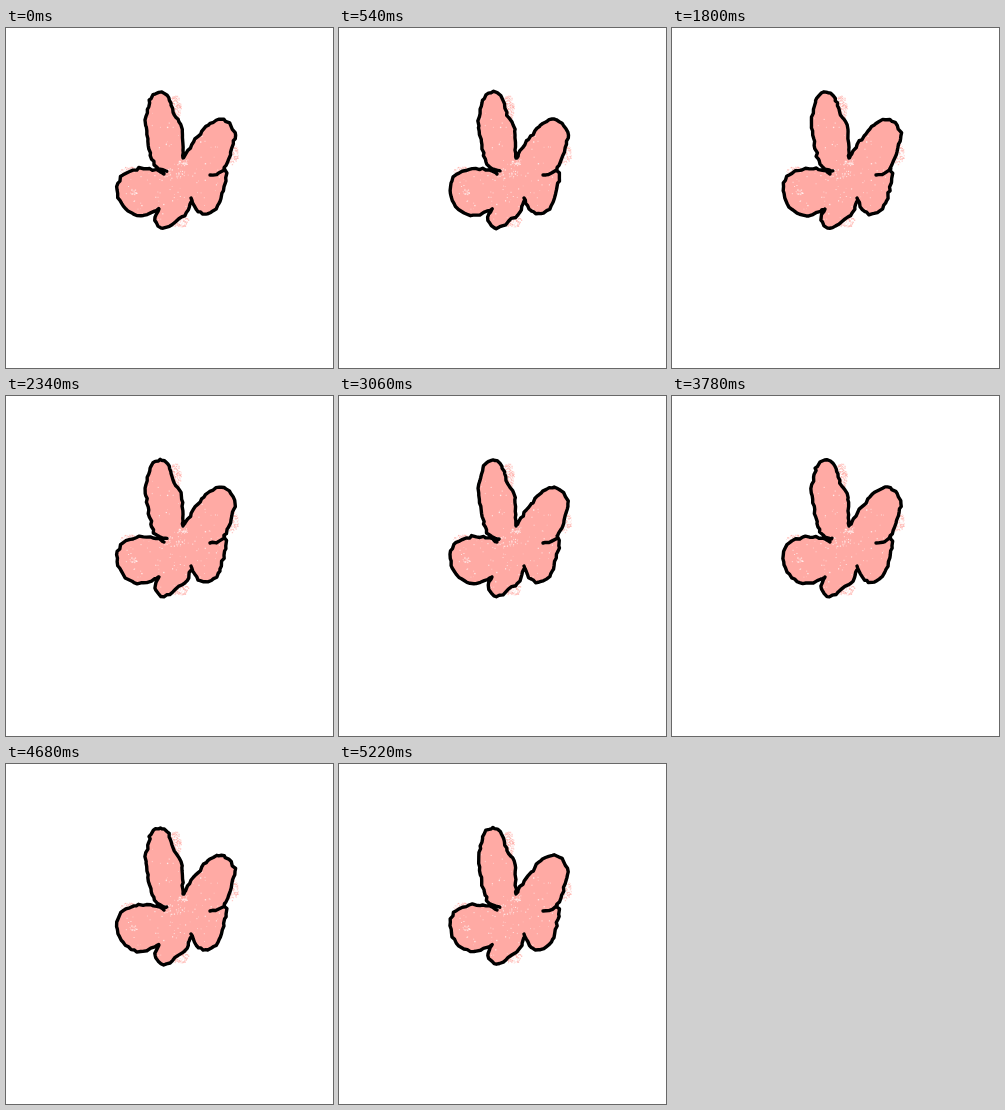
These frames come from a looping animation (327 px wide and 340 px high, 5400 ms). An HTML page with a canvas:

```html
<!DOCTYPE html>
<html lang="en">
<head>
<meta charset="utf-8">
<title>Wobbling flower</title>
<style>
  html, body { margin: 0; width: 100%; height: 100%; overflow: hidden; background: #fff; }
  canvas { display: block; }
</style>
</head>
<body>
<canvas id="stage" width="327" height="340"></canvas>
<script>
const STEP = 180, STEPS = 30;
const PINK = '#ffaaa4';
const ctx = document.getElementById('stage').getContext('2d');

// Key points of the five pen strokes, clockwise
const petals = [
  '161,143 148,136 140,97 145,70 154,64 163,70 168,87 176,101 177,130',
  '177,130 190,111 204,95 218,92 229,108 217,142 204,147',
  '218,140 220,150 212,178 200,186 190,181 185,170',
  '185,174 178,187 158,200 149,192 153,181',
  '153,181 134,188 115,176 113,152 130,141 150,142 158,146'
].map(s => s.split(' ').map(p => p.split(',').map(Number)));

function random(seed) {
  let a = seed * 7919 + 17;
  return () => {
    a = (a + 0x6D2B79F5) | 0;
    let t = Math.imul(a ^ (a >>> 15), 1 | a);
    t = (t + Math.imul(t ^ (t >>> 7), 61 | t)) ^ t;
    return ((t ^ (t >>> 14)) >>> 0) / 4294967296;
  };
}

// Catmull-Rom blend of four neighbouring values
const spline = (a, b, c, d, t) =>
  b + t / 2 * (c - a + t * (2 * a - 5 * b + 4 * c - d + t * (3 * (b - c) + d - a)));

// Follow a smooth curve in short steps with an unsteady hand
function sketch(keys, paper, hand) {
  const at = i => keys[Math.max(0, Math.min(keys.length - 1, i))];
  const shake = () => (paper() - 0.5) * 1.3 + (hand() - 0.5) * 1.2;
  const pts = [];
  for (let i = 0; i < keys.length - 1; i++) {
    const [a, b, c, d] = [at(i - 1), at(i), at(i + 1), at(i + 2)];
    const n = Math.ceil(Math.hypot(c[0] - b[0], c[1] - b[1]) / 3.5);
    for (let j = 0; j < n; j++) {
      pts.push([0, 1].map(k => spline(a[k], b[k], c[k], d[k], j / n) + shake()));
    }
  }
  pts.push(at(keys.length));
  return pts;
}

function dust(cx, cy, rx, ry, count, color, rnd, hand) {
  ctx.fillStyle = color;
  for (let i = 0; i < count; i++) {
    const angle = rnd() * Math.PI * 2, r = Math.sqrt(rnd());
    const size = 0.6 + rnd() * 0.8;
    ctx.globalAlpha = 0.3 + 0.5 * rnd();
    if (hand() > 0.1) {
      ctx.fillRect(cx + Math.cos(angle) * r * rx, cy + Math.sin(angle) * r * ry, size, size);
    }
  }
  ctx.globalAlpha = 1;
}

function draw(step) {
  const paper = random(5), hand = random(step + 101);
  const lines = petals.map(keys => sketch(keys, paper, hand));
  const body = new Path2D(), ink = new Path2D();
  for (const pts of lines) {
    pts.forEach((p, i) => {
      body.lineTo(...p);
      ink[i ? 'lineTo' : 'moveTo'](...p);
    });
  }

  ctx.fillStyle = '#fff';
  ctx.fillRect(0, 0, 327, 340);

  // Crayon straying over the edge
  dust(169, 80, 6, 13, 230, PINK, paper, hand);
  dust(226, 125, 6, 11, 140, PINK, paper, hand);
  dust(123, 144, 9, 6, 120, PINK, paper, hand);
  dust(173, 191, 10, 8, 200, PINK, paper, hand);

  ctx.fillStyle = PINK;
  ctx.fill(body);

  // Bare paper showing through
  ctx.save();
  ctx.clip(body);
  dust(165, 140, 50, 60, 180, '#fff', paper, hand);
  dust(177, 134, 5, 4, 40, '#fff', paper, hand);
  dust(166, 145, 14, 5, 35, '#fff', paper, hand);
  dust(128, 163, 5, 3, 20, '#fff', paper, hand);
  ctx.restore();

  ctx.strokeStyle = '#000';
  ctx.lineWidth = 3.4;
  ctx.lineCap = ctx.lineJoin = 'round';
  ctx.stroke(ink);
}

let shown = -1;
function tick() {
  const step = Math.floor(performance.now() / STEP) % STEPS;
  if (step !== shown) draw(shown = step);
  requestAnimationFrame(tick);
}
tick();
</script>
</body>
</html>
```
